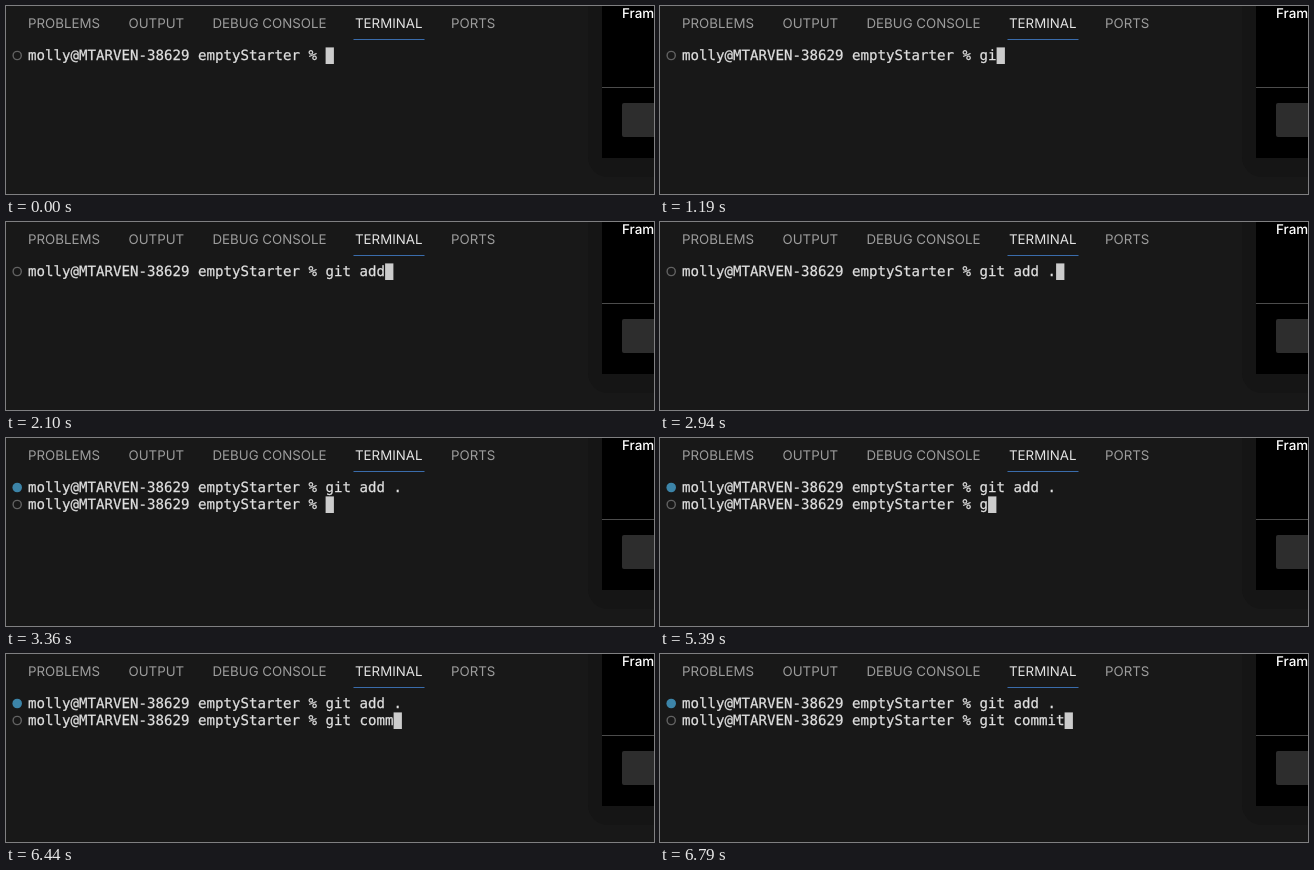
An HTML page with a canvas for the animation above (8 s loop, 648 px wide and 188 px high).

```html
<!DOCTYPE html>
<html lang="en">
<head>
<meta charset="utf-8">
<title>Terminal</title>
<style>
  html, body { margin: 0; width: 100%; height: 100%; overflow: hidden; background: #181818; }
  canvas { display: block; width: 648px; height: 188px; }
</style>
</head>
<body>
<canvas id="stage"></canvas>
<script>
const W = 648, H = 188, LOOP = 8000;
const canvas = document.getElementById('stage');
const ctx = canvas.getContext('2d');
const dpr = window.devicePixelRatio || 1;
canvas.width = W * dpr;
canvas.height = H * dpr;
ctx.textRendering = 'geometricPrecision';

const SANS = 'Inter, "Open Sans", sans-serif';
const MONO = '"DejaVu Sans Mono", "Liberation Mono", monospace';
const CELL = 8.5, ROW = 17, LEFT = 22.1, TOP = 41.4;
const PROMPT = 'molly@MTARVEN-38629 emptyStarter % ';
const ENTER = 3360;
const commands = [
  { text: 'git add .', keys: [1120, 1190, 1330, 1540, 1750, 1890, 2100, 2520, 2940] },
  { text: 'git commit', keys: [5390, 5530, 5670, 5810, 6020, 6090, 6230, 6440, 6580, 6790] }
];
const tabs = [['PROBLEMS', 22], ['OUTPUT', 122.5], ['DEBUG CONSOLE', 206.5], ['TERMINAL', 349], ['PORTS', 445]];

function rect(x, y, w, h, color, radius = 0) {
  ctx.fillStyle = color;
  ctx.beginPath();
  ctx.roundRect(x, y, w, h, radius);
  ctx.fill();
}

function label(text, x, y, font, color) {
  ctx.font = `${font} ${SANS}`;
  ctx.fillStyle = color;
  ctx.fillText(text, x, y);
}

function drawTabs() {
  for (const [name, x] of tabs) {
    label(name, x, 22, '13.3px', name === 'TERMINAL' ? '#e4e4e4' : '#9d9d9d');
  }
  rect(347.5, 33, 71, 1, '#3a6cab');
}

function drawPhone() {
  rect(582, -40, 120, 211, '#151515', 20);
  rect(596, 0, 52, 152, '#000');
  label('Fram', 616, 12, '500 13.4px', '#fff');
  rect(596, 81, 52, 1, '#4c4c4c');
  rect(616, 97, 40, 34, '#2d2d2d', 2);
}

function drawDot(row, done) {
  ctx.beginPath();
  ctx.arc(11.2, 49.5 + row * ROW, done ? 4.8 : 4.1, 0, Math.PI * 2);
  if (done) {
    ctx.fillStyle = '#3c84a8';
    ctx.fill();
  } else {
    ctx.strokeStyle = '#626262';
    ctx.lineWidth = 1.4;
    ctx.stroke();
  }
}

function drawLine(row, t, done) {
  const { text, keys } = commands[row];
  const line = PROMPT + text.slice(0, keys.filter(k => t >= k).length);
  const base = 54 + row * ROW;
  drawDot(row, done);
  ctx.font = `14.1px ${MONO}`;
  ctx.fillStyle = ctx.strokeStyle = '#e0e0e0';
  ctx.lineWidth = 0.25;
  [...line].forEach((ch, i) => {
    ctx.fillText(ch, LEFT + i * CELL, base);
    ctx.strokeText(ch, LEFT + i * CELL, base);
  });
  if (!done) rect(LEFT + line.length * CELL, TOP + row * ROW, 8.3, 16.6, '#cccccc');
}

function draw(t) {
  ctx.setTransform(dpr, 0, 0, dpr, 0, 0);
  rect(0, 0, W, H, '#181818');
  drawTabs();
  drawPhone();
  const entered = t >= ENTER;
  drawLine(0, t, entered);
  if (entered) drawLine(1, t, false);
}

const start = performance.now();
function tick() {
  draw((performance.now() - start) % LOOP);
  requestAnimationFrame(tick);
}
tick();
</script>
</body>
</html>
```
